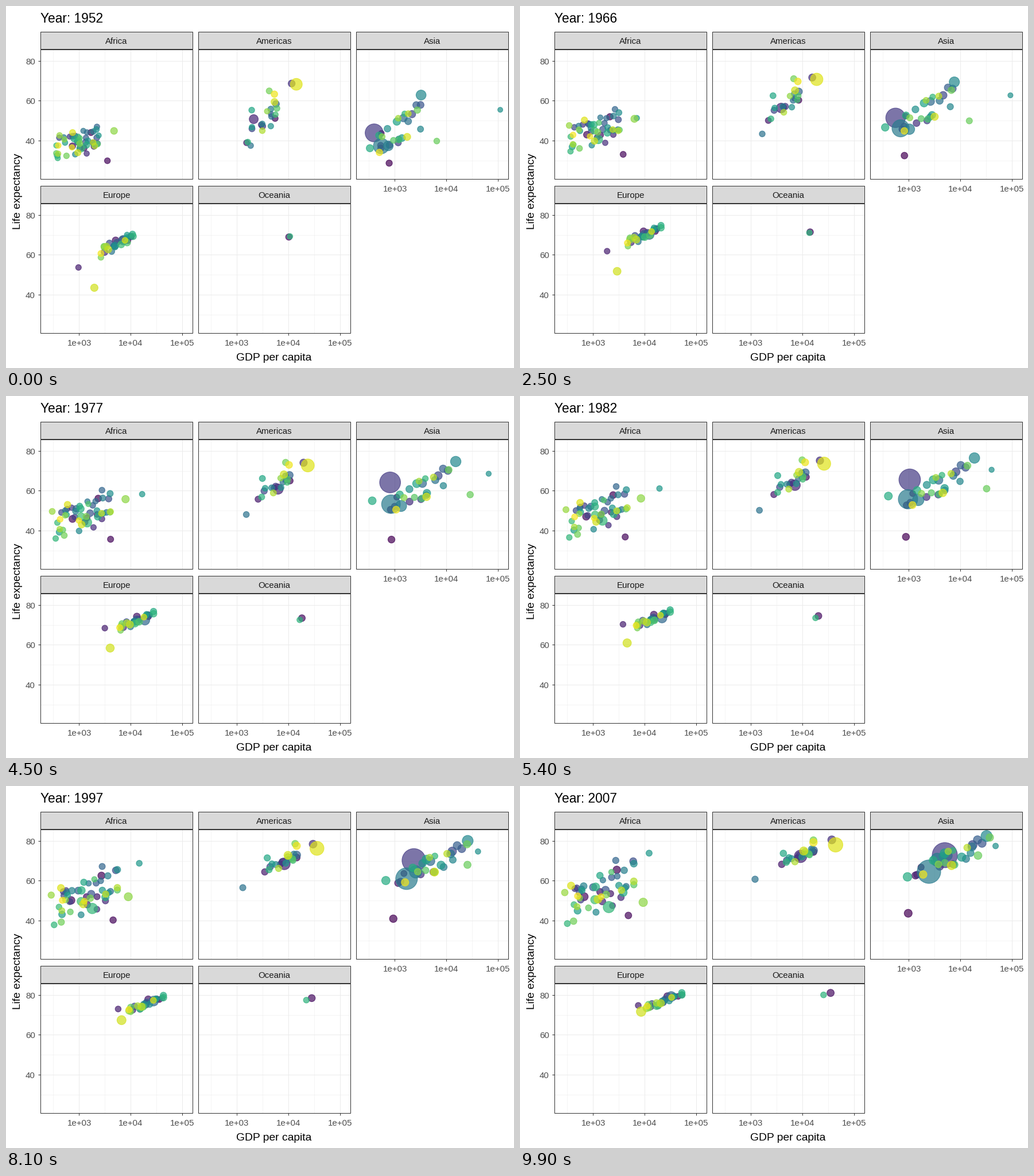
A matplotlib script for the animation above (10000 ms loop, 885 px wide and 632 px high).

```python
import matplotlib.pyplot as plt
import numpy as np
from matplotlib.animation import FuncAnimation
from matplotlib.patches import Rectangle

W, H, DPI = 885, 632, 64
PT = 72 / DPI  # points per pixel
FRAMES, INTERVAL = 100, 100
INK, GRID, AXIS_TEXT = "#333333", "#EBEBEB", "#4D4D4D"
RANKS = 141  # colour steps over all panels

rng = np.random.default_rng(5)
t = np.arange(FRAMES) / (FRAMES - 1)
years = 1952 + 55 * t
rise = t ** 0.7  # gains come fast at first, then slow down


def along(points):
    """Straight moves through evenly timed waypoints."""
    return np.interp(t, np.linspace(0, 1, len(points)), points)


def dot(rank, pop, incomes, lives):
    """One landmark bubble; pop is (first, last) in millions."""
    people = pop[0] * (pop[1] / pop[0]) ** t
    return rank, people, along(np.log10(incomes)), along(lives)


def crowd(n, pop, growth, start, end):
    """Seeded cloud; start and end are (log income, spread, life, slope, scatter)."""
    start, end = np.array(start), np.array(end)
    for i in range(n):
        u, v = rng.uniform(-1.7, 1.7, 2)
        drift = rng.normal(0, 0.5, 2)
        mean, spread, life, slope, scatter = np.outer(end - start, rise) + start[:, None]
        shift = spread * np.clip(u + drift[0] * t, -1.8, 1.8)
        people = pop * np.exp(rng.normal(0, 0.7)) * growth ** t
        yield ((i + 0.5) * RANKS / n, people, mean + shift,
               life + slope * shift + scatter * (v + drift[1] * t))


africa = [
    dot(3, (4, 12), (3521, 4797), (30, 42.7)),
    dot(75, (1, 6), (2388, 20000, 12057), (42.7, 60, 74)),
    dot(94, (33, 135), (1077, 2014), (36.3, 45, 46.9)),
    dot(117, (14, 44), (4725, 8300, 9270), (45, 57, 49.3)),
    *crowd(48, 3, 3.6, (2.97, 0.25, 39, 5, 3.7), (3.12, 0.37, 55, 11, 5.5)),
]
americas = [
    dot(14, (57, 190), (2109, 6900, 9066), (50.9, 62, 72.4)),
    dot(20, (15, 33), (11367, 36319), (68.8, 80.7)),
    dot(53, (3, 8.5), (1840, 1202), (37.6, 60.9)),
    dot(134, (158, 301), (13990, 42952), (68.4, 78.2)),
    *crowd(21, 4, 2.6, (3.48, 0.18, 53, 20, 5.5), (3.9, 0.17, 73.5, 10, 1.8)),
]
asia = [
    dot(0, (8, 32), (779, 975), (28.8, 43.8)),
    dot(24, (556, 1319), (400, 512, 700, 1210, 2165, 4959),
        (44, 47.3, 63.5, 66.5, 70.1, 73)),
    dot(58, (372, 1110), (547, 880, 2452), (37.4, 55, 64.7)),
    dot(59, (82, 223), (750, 1400, 3541), (37.5, 54, 70.7)),
    dot(66, (86, 127), (3217, 17500, 31656), (63, 76, 82.6)),
    dot(71, (0.2, 2.5), (108382, 93000, 87000, 29500, 39700, 47307), (55.6, 70, 77.6)),
    dot(87, (20, 48), (331, 371, 944), (36.3, 57, 62.1)),
    dot(109, (4, 28), (6460, 33000, 21655), (39.9, 60, 72.8)),
    *crowd(25, 8, 2.6, (3.12, 0.27, 46.5, 15, 4.5), (3.85, 0.4, 72, 10, 2.3)),
]
europe = [
    dot(12, (2.8, 4.5), (974, 3528, 7446), (53.8, 70, 74.9)),
    dot(47, (69, 82), (7144, 20513, 32170), (67.5, 73, 79.4)),
    dot(131, (22, 71), (1969, 4269, 8458), (43.6, 60, 71.8)),
    *crowd(27, 9, 1.3, (3.72, 0.19, 65.5, 15, 1.7), (4.37, 0.19, 77.3, 11, 1)),
]
oceania = [
    dot(5, (8.7, 20), (10040, 19000, 34435), (69.1, 74, 81.2)),
    dot(91, (2, 4.1), (10557, 17000, 25185), (69.4, 73, 80.2)),
]

# name, column, row, dots, x labels, y labels
PANELS = [
    ("Africa", 0, 0, africa, False, True),
    ("Americas", 1, 0, americas, False, False),
    ("Asia", 2, 0, asia, True, False),
    ("Europe", 0, 1, europe, True, True),
    ("Oceania", 1, 1, oceania, True, False),
]


def to_x(left, log_income):
    return left + 67.3 + 90.3 * (log_income - 3)


def to_y(top, life):
    return top + 51.4 + 3.475 * (80 - life)


fig = plt.figure(figsize=(W / DPI, H / DPI), dpi=DPI, facecolor="white")
ax = fig.add_axes([0, 0, 1, 1])
ax.set_xlim(0, W)
ax.set_ylim(H, 0)
ax.axis("off")


def crisp(v):
    return np.floor(v) + 0.5


def line(xs, ys, color=GRID, width=1):
    ax.plot(xs, ys, color=color, lw=width * PT, zorder=1,
            solid_capstyle="butt", snap=False)


def box(x, y, w, h, fill):
    ax.add_patch(Rectangle((x, y), w, h, facecolor=fill, edgecolor=INK,
                           lw=PT, zorder=4, snap=False))


def label(x, y, text, px, color="black", ha="center", **kw):
    return ax.text(x, y, text, fontsize=px * PT, color=color, ha=ha,
                   va="baseline", family="Liberation Sans", zorder=6, **kw)


def draw_panel(name, left, top, x_labels, y_labels):
    x0, x1 = left + 0.5, left + 265.5
    y0, y1 = top + 31.5, top + 257.5
    for k in np.arange(2.5, 5.1, 0.5):
        x = crisp(to_x(left, k))
        major = k % 1 == 0
        line([x, x], [y0, y1], width=1 if major else 0.5)
        if major and x_labels:
            line([x, x], [y1, y1 + 4], INK)
            label(x, y1 + 21.3, f"1e+{int(k):02d}", 15, AXIS_TEXT)
    for life in range(30, 90, 10):
        y = crisp(to_y(top, life))
        major = life % 20 == 0
        line([x0, x1], [y, y], width=1 if major else 0.5)
        if major and y_labels:
            line([x0 - 4, x0], [y, y], INK)
            label(51, y + 5.3, str(life), 15, AXIS_TEXT, "right")
    box(x0, top + 0.5, 265, 30, "#D9D9D9")
    box(x0, y0, 265, 226, "none")
    label(left + 132.5, top + 21, name, 15, "#1A1A1A")


paths, radii, ranks = [], [], []
for name, col, row, dots, x_labels, y_labels in PANELS:
    left, top = 60 + 275 * col, 45 + 269 * row
    draw_panel(name, left, top, x_labels, y_labels)
    for rank, people, income, life in sorted(dots, key=lambda d: d[0]):
        paths.append(np.column_stack([to_x(left, income), to_y(top, life)]))
        radii.append(4.15 + 0.49 * np.sqrt(people))
        ranks.append(rank / RANKS)
paths, radii = np.array(paths), np.array(radii)

colors = plt.get_cmap("viridis")(ranks)
colors[:, 3] = 0.7
bubbles = ax.scatter(*paths[:, 0].T, s=10, facecolors=colors,
                     edgecolors=colors, linewidths=1.18 * PT, zorder=3)
title = label(60, 28.6, "", 22.8, ha="left")
label(467, 618.6, "GDP per capita", 19.3)
label(25, 324, "Life expectancy", 19.1, rotation=90, rotation_mode="anchor")


def update(i):
    bubbles.set_offsets(paths[:, i])
    bubbles.set_sizes((2 * radii[:, i] * PT) ** 2)
    title.set_text(f"Year: {round(years[i])}")
    return bubbles, title


anim = FuncAnimation(fig, update, frames=FRAMES, interval=INTERVAL,
                     repeat=True, repeat_delay=0)
plt.show()
```
